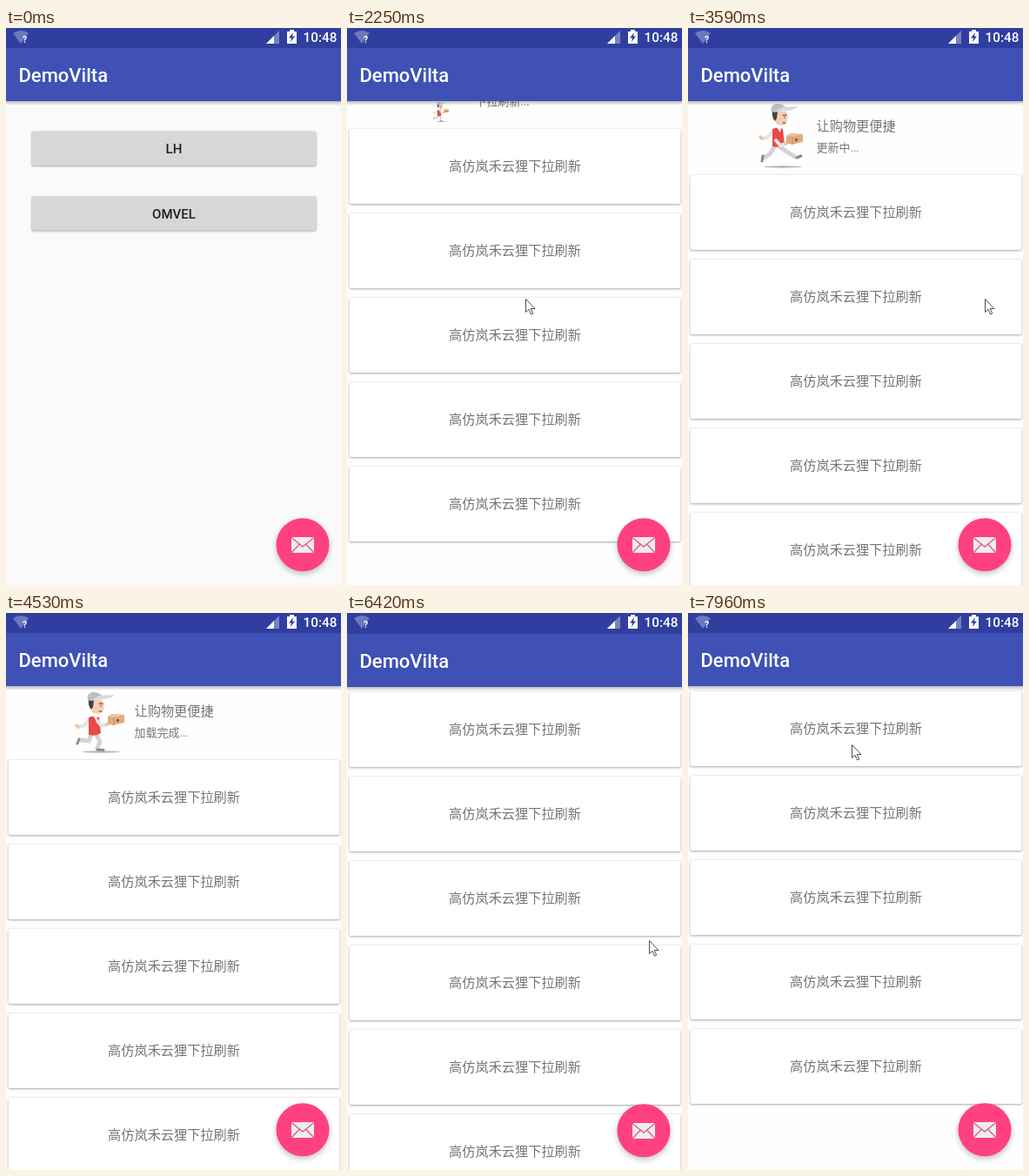
Animation of 385 by 640 pixels, one loop 8000 ms. Source, as an HTML page:

```html
<!DOCTYPE html>
<html lang="zh-CN">
<head>
<meta charset="utf-8">
<title>Pull to refresh</title>
<style>
  html, body { margin: 0; width: 100%; height: 100%; overflow: hidden; background: #fafafa; }
  svg { display: block; width: 100vw; height: 100vh; }
  text { font-family: Roboto, "Noto Sans CJK SC", "Noto Sans CJK", sans-serif; }
  .title { font-size: 22px; font-weight: 500; fill: #fff; }
  .label { font-size: 15px; font-weight: 500; fill: #212121; text-anchor: middle; }
  .item { font-size: 15.2px; fill: #757575; }
  .mid { text-anchor: middle; }
  .sub { font-size: 13px; fill: #757575; }
  .raised { filter: drop-shadow(0 1px 1px rgba(0, 0, 0, .32)); }
  .fab { filter: drop-shadow(0 3px 3px rgba(0, 0, 0, .24)); }
  .limb { fill: none; stroke-linecap: round; stroke-linejoin: round; }
</style>
</head>
<body>
<svg id="stage" viewBox="0 0 385 640" preserveAspectRatio="none"></svg>
<script>
const LOOP = 8000, STEP = 78, TOP = 89, PITCH = 97;
const RUNS = [0, 70, 920, 1920, 2740, 3590, 4460, 5330, 6420, 7330, 7570, 7960];

const bar = `
  <rect y="84" width="385" height="5" fill="url(#shade)"/>
  <rect width="385" height="84" fill="#3f51b5"/>
  <rect width="385" height="23" fill="#303f9f"/>
  <text class="title" x="14.5" y="62">DemoVilta</text>`;

const fab = `
  <circle class="fab" cx="341" cy="593.7" r="30.5" fill="#ff4081"/>
  <rect x="328" y="585" width="26" height="18" fill="#eee"/>
  <path d="M328 585.5L341 596L354 585.5M328 603L337 593.5M354 603L345 593.5" fill="none" stroke="#e0608c" stroke-width="1.5"/>`;

const button = (y, name, id) => `
  <rect class="raised" x="29.5" y="${y}" width="327" height="39.5" rx="2" fill="#d6d7d7"/>
  <rect id="${id}" x="29.5" y="${y}" width="327" height="39.5" rx="2" opacity="0"/>
  <text class="label" x="193" y="${y + 25.5}">${name}</text>`;

const card = i => `
  <g id="card${i}" transform="translate(0 ${i * PITCH})">
    <rect class="raised" x="2.5" y=".5" width="381" height="86.5" rx="2" fill="#fff" stroke="#000" stroke-opacity=".06" stroke-width=".7"/>
    <text class="item mid" x="193" y="49">高仿岚禾云狸下拉刷新</text>
  </g>`;

// Courier, drawn relative to the top edge of the first card
const courier = `
  <g id="courier">
    <ellipse cx="109" cy="-8.5" rx="22" ry="1.2" fill="#b5b5b5"/>
    <g class="limb" stroke="#d2d5d7" stroke-width="5">
      <path id="backLeg"/><path id="frontLeg"/>
    </g>
    <g class="limb" stroke="#878c90" stroke-width="3">
      <path id="backShoe"/><path id="frontShoe"/>
    </g>
    <g id="body">
      <path class="limb" d="M95 -45L89 -38L83 -37" stroke="#e2e4e6" stroke-width="4"/>
      <path class="limb" d="M83 -37L81 -39" stroke="#f0c3a2" stroke-width="3.5"/>
      <path d="M95 -48Q101 -51 107 -48L109 -30Q103 -26 95 -28Z" fill="#e94a47"/>
      <path d="M100 -50L105 -50L104 -44Z" fill="#fff"/>
      <path d="M97 -68H111L113 -62L111 -54Q106 -50 99 -54Z" fill="#f5cfb3"/>
      <path d="M95 -68H101L100 -60L98 -57Q94 -61 95 -68Z" fill="#4b403d"/>
      <path class="limb" d="M107 -64H111M109 -62V-61M107 -55H110" stroke="#4b403d" stroke-width="1.1"/>
      <path d="M94 -67Q92 -77 101 -77Q109 -77 111 -71Z" fill="#b9bfc4"/>
      <path d="M107 -73L124 -74Q123 -70 112 -69L96 -67Z" fill="#d6dadd"/>
    </g>
    <g id="parcel">
      <path class="limb" d="M105 -44L110 -38L116 -40" stroke="#e2e4e6" stroke-width="4"/>
      <path class="limb" d="M116 -40L118 -41" stroke="#f0c3a2" stroke-width="3.5"/>
      <path d="M117 -49L122 -52L136 -51V-42L123 -39L117 -41Z" fill="#dfae80"/>
      <path d="M117 -49L122 -52L136 -51L124 -48Z" fill="#edc49b"/>
      <path d="M124 -48V-39" stroke="#b98252" stroke-width=".8"/>
      <rect x="127" y="-46" width="3" height="3" fill="#b04a3c"/>
    </g>
  </g>`;

const status = `
  <path d="M8 6Q17 0 26 6L17 18Z" fill="#fff" opacity=".3"/>
  <text x="19" y="17" font-size="10.5" font-weight="700" fill="#fff">?</text>
  <path d="M314 3V18H299Z" fill="#fff" opacity=".35"/>
  <path d="M308 9V18H299Z" fill="#fff"/>
  <path d="M323 4H326V2H331V4H334V18H323Z" fill="#fff"/>
  <path d="M330 5L325 11.5H328L327 16L332 9.5H329Z" fill="#303f9f"/>
  <text x="341.5" y="16" font-size="15.3" font-weight="500" fill="#fff">10:48</text>`;

document.getElementById('stage').innerHTML = `
  <defs><linearGradient id="shade" x2="0" y2="1">
    <stop stop-opacity=".26"/><stop offset="1" stop-opacity="0"/>
  </linearGradient></defs>
  <rect width="385" height="640" fill="#fafafa"/>
  ${button(118.5, 'LH', 'press1')}${button(193, 'OMVEL', 'press2')}${bar}${fab}
  <g id="page">
    <rect width="385" height="640" fill="#fefefe"/>
    <g id="list">
      ${courier}
      <text class="item" x="147.5" y="-50.5">让购物更便捷</text>
      <text class="sub" id="hint" x="147.5" y="-26.5"></text>
      ${[0, 1, 2, 3, 4, 5].map(card).join('')}
    </g>
    ${bar}${fab}
  </g>
  ${status}
  <path id="cursor" d="M.5 .5V15.5L4 12.3L6.5 18L8.7 17L6.2 11.5H11Z" fill="#fff" stroke="#222" stroke-width=".8"/>`;

const ui = {};
document.querySelectorAll('[id]').forEach(el => ui[el.id] = el);
const set = (id, name, value) => ui[id].setAttribute(name, value);
const move = (id, x, y) => set(id, 'transform', `translate(${x} ${y})`);
const show = (id, on) => set(id, 'visibility', on ? 'visible' : 'hidden');

// Linear track of [time, ...values]
function track(t, keys) {
  if (t <= keys[0][0]) return keys[0].slice(1);
  for (let i = 1; i < keys.length; i++) {
    const a = keys[i - 1], b = keys[i];
    if (t < b[0]) {
      const u = (t - a[0]) / (b[0] - a[0]);
      return a.slice(1).map((v, k) => v + (b[k + 1] - v) * u);
    }
  }
  return keys[keys.length - 1].slice(1);
}

const OPEN = [[0, 46, .2], [78, 24, .69], [156, 5, 1], [234, 0, 1]];
const CLOSE = [[0, 1, 1], [78, 6, 1], [156, 20, .8], [234, 42, .25], [312, 51, 0]];
const CURSOR = [
  [70, 293, 535], [382, 235, 250], [538, 179, 58], [694, 202, 139], [1920, 202, 139],
  [2076, 204, 259], [2740, 208, 479], [2896, 208, 479], [3590, 341, 311], [4222, 385, 383],
  [6419, 385, 383], [6420, 347, 376], [6576, 347, 376], [7100, 188, 209],
  [7959, 188, 209], [7960, 188, 151]
];
// Body shift, parcel shift, then legs and shoes
const POSES = [
  [0, 0, 0, 0, 'M98 -28L95 -21L87 -22', 'M104 -28L108 -20L105 -13', 'M84 -23L82 -18', 'M105 -11L112 -10.5'],
  [2, -4, -4, 5, 'M99 -31L94 -23L87 -19', 'M106 -31L115 -25L123 -20', 'M86 -21L85 -15', 'M125 -19L130 -21'],
  [3, -1, -2, 2, 'M102 -29L102 -20L94 -17', 'M106 -29L112 -21L109 -13', 'M92 -19L90 -15', 'M109 -11L116 -11']
];

function windowState(t) {
  if (t < 1232) return [0, 0];
  if (t < 6420) return track(t - 1232, OPEN);
  if (t < 7570) return track(t - 6420, CLOSE);
  return track(t - 7570, OPEN);
}

function pullOffset(t) {
  if (t < 5175) return track(t, [[2076, 0], [2740, 110], [2818, 110], [3130, 79]])[0];
  return 79 * (1 - Math.sin(Math.min(1, (t - 5175) / 380) * Math.PI / 2));
}

function hintText(t) {
  if (t < 2600) return '下拉刷新...';
  if (t < 3050) return '松开刷新...';
  return t < 4460 ? '更新中...' : '加载完成...';
}

function draw(time) {
  const run = RUNS.filter(r => r <= time).pop();
  const t = run + Math.floor((time - run) / STEP) * STEP;

  const [slide, alpha] = windowState(t);
  move('page', 0, Math.round(slide));
  set('page', 'opacity', alpha);
  show('page', alpha > 0);

  const pull = Math.round(pullOffset(t));
  move('list', 0, TOP + pull);
  ui.hint.textContent = hintText(t);
  show('card5', alpha > 0 && t >= 4460 && t < 7300);

  const running = t >= 3050 && t < 4460;
  const phase = running ? 1 + Math.abs(Math.floor((t - 3590) / STEP)) % 2 : 0;
  const [bx, by, px, py, back, front, heel, toe] = POSES[phase];
  move('body', bx, by);
  move('parcel', px, py);
  set('backLeg', 'd', back);
  set('frontLeg', 'd', front);
  set('backShoe', 'd', heel);
  set('frontShoe', 'd', toe);
  const size = t < 2740 ? Math.min(1, pull / 79) : 1;
  set('courier', 'transform', `translate(108 -7) scale(${size}) translate(-108 7)`);

  set('press1', 'opacity', t >= 920 && t < 1500 ? track(t, [[920, .03], [1076, .1]])[0] : 0);
  set('press2', 'opacity', t >= 7330 ? .09 : 0);

  move('cursor', ...track(t, CURSOR).map(Math.round));
  show('cursor', t >= 70 && (t < 4222 || t >= 6420));
}

const start = performance.now();
function tick() {
  draw((performance.now() - start) % LOOP);
  requestAnimationFrame(tick);
}
tick();
</script>
</body>
</html>
```
